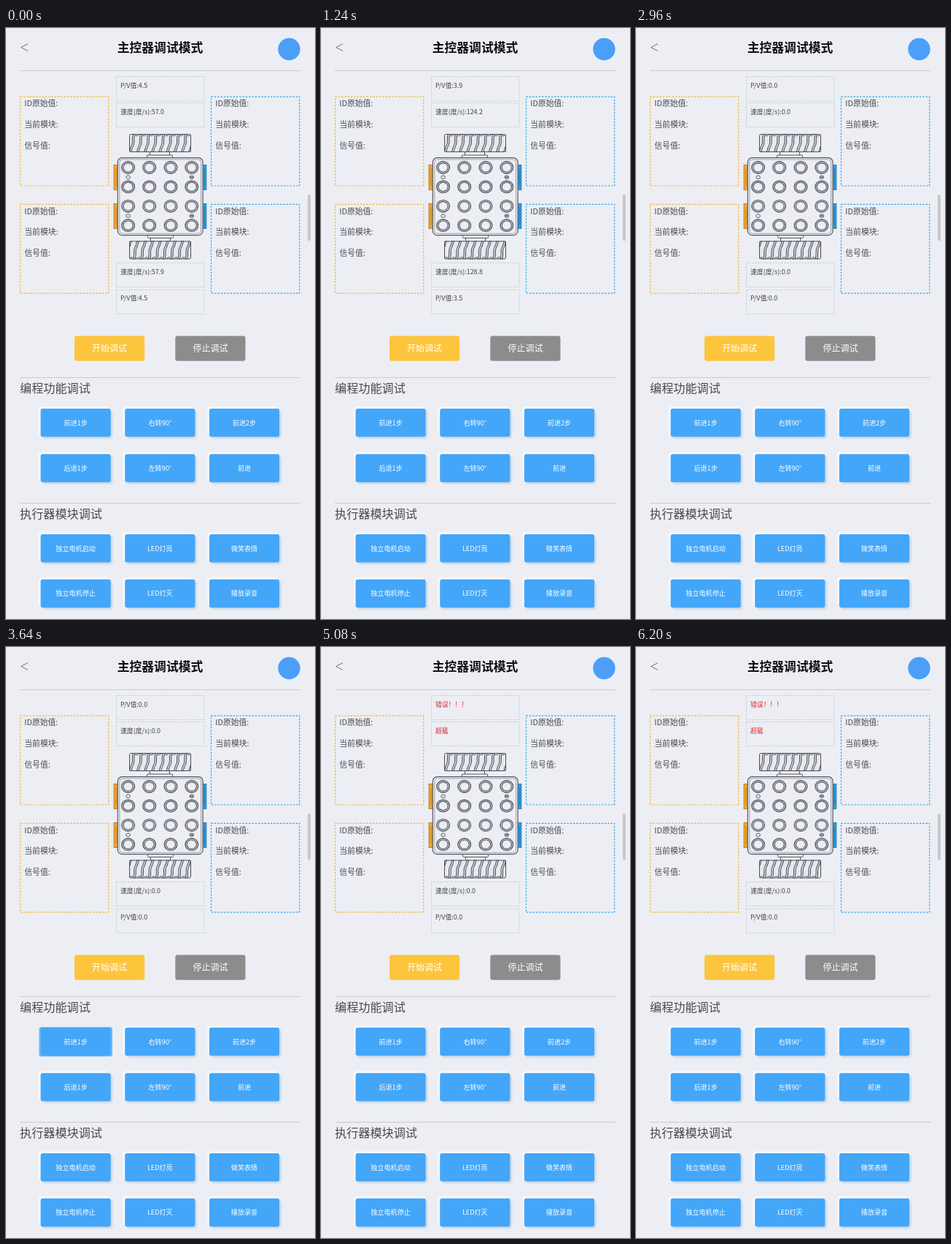
An HTML page that plays this animation: 424x809 px, repeating every 6450 ms.

```html
<!DOCTYPE html>
<html lang="zh-CN">
<head>
<meta charset="utf-8">
<title>主控器调试模式</title>
<style>
html, body { margin: 0; width: 100%; height: 100%; overflow: hidden; background: #eceef4; }
svg { display: block; width: 100%; height: 100%; }
text { font-family: "Noto Sans CJK SC", "Noto Sans CJK", sans-serif; fill: #494a50; }
.title { font-size: 16.8px; font-weight: 700; fill: #0c0c0e; }
.heading { font-size: 16.15px; }
.label { font-size: 10.8px; }
.reading { font-size: 8.9px; fill: #414247; }
.error { fill: #e6202a; }
.main { font-size: 12px; fill: #fff; }
.small { font-size: 9.1px; fill: #fff; }
.outline { fill: #eceef4; stroke: #565760; }
</style>
</head>
<body>
<svg id="stage" viewBox="0 0 424 809">
  <defs>
    <filter id="soft" x="-20%" y="-30%" width="140%" height="160%"><feGaussianBlur stdDeviation="1.3"/></filter>
    <filter id="glow" x="-20%" y="-30%" width="140%" height="160%"><feGaussianBlur stdDeviation=".7"/></filter>
    <clipPath id="tyre"><rect x="169" y="145" width="85" height="25" rx="2"/></clipPath>
  </defs>
</svg>
<script>
const LOOP = 6450;
const stage = document.getElementById('stage');

function add(tag, attrs, parent = stage) {
  const node = document.createElementNS('http://www.w3.org/2000/svg', tag);
  for (const key in attrs) node.setAttribute(key, attrs[key]);
  return parent.appendChild(node);
}
function rect(x, y, width, height, attrs, parent) {
  return add('rect', { x, y, width, height, ...attrs }, parent);
}
function write(x, y, content, style, anchor = 'start') {
  const node = add('text', { x, y, class: style, 'text-anchor': anchor });
  node.textContent = content;
  return node;
}

// Header
add('path', { d: 'M30 21.7 20.5 26.5 30 31.3', fill: 'none', stroke: '#66676d', 'stroke-width': .9 });
write(211.5, 33, '主控器调试模式', 'title', 'middle');
add('circle', { cx: 388.5, cy: 29, r: 15.2, fill: '#4b9ff9' });
for (const y of [58.5, 478.5, 650.5])
  add('path', { d: `M19 ${y}H404`, stroke: '#c9cbd0' });
rect(414, 228, 4, 63.5, { rx: 2, fill: '#c7c8cc' });

// Sensor panels
for (const [x, color] of [[19.5, '#f7b32d'], [281.5, '#2ba4ec']])
  for (const y of [94.2, 241.4]) {
    rect(x, y, 121.2, 121.8, { fill: 'none', stroke: color, 'stroke-width': 1.2, 'stroke-dasharray': '2.4 1.9' });
    ['ID原始值:', '当前模块:', '信号值:'].forEach((name, i) =>
      write(x + 5.8, y + 13.2 + i * 28.7, name, 'label'));
  }

// Motor panels
const readings = [66.5, 102.5, 321.5, 358.5].map((y, i) => {
  rect(151.5, y, 120.5, 33, { fill: 'none', stroke: '#c3cbd0', 'stroke-dasharray': '2.2 1.8' });
  return write(157, [81.8, 117.8, 336.6, 372.9][i], '', 'reading');
});

// Robot
function wheel(transform) {
  const group = add('g', { transform });
  rect(197.5, 169, 27, 6, { class: 'outline' }, group);
  rect(193.5, 174, 35, 4, { class: 'outline', rx: 1 }, group);
  const tyre = add('g', { 'clip-path': 'url(#tyre)' }, group);
  rect(169, 145, 85, 25, { fill: '#e7e9ef' }, tyre);
  for (let i = 0; i < 9; i++) {
    const x = 170.5 + i * 10.2;
    const d = `M${x + 6} 144C${x + 2} 150 ${x + 6} 156 ${x + 3} 161S${x + 2} 167 ${x - 1} 171`;
    add('path', { d, fill: 'none', stroke: '#3f4048', 'stroke-width': 3.4 }, tyre);
    add('path', { d, fill: 'none', stroke: '#dfe1e7', 'stroke-width': 1.5 }, tyre);
    add('path', { d: `M${x + 7} 147.5q3 .6 5-1.5`, fill: 'none', stroke: '#4c4d56' }, tyre);
  }
  rect(169.5, 145.5, 84, 24, { rx: 2, fill: 'none', stroke: '#4c4d56' }, group);
}
wheel('');
wheel('rotate(180 211.5 230.75)');

for (const y of [187.4, 240.4])
  for (const [x, color, edge] of [[148, '#f2a52e', '#a87626'], [269.5, '#279ce6', '#246f9d']]) {
    rect(x, y, 5.4, 34.2, { fill: color, stroke: edge, 'stroke-width': .8 });
    add('path', { d: `M${x + 3} ${y + 5}v24`, stroke: edge, 'stroke-width': .7 });
  }
rect(153.3, 177.7, 116.8, 106, { rx: 6, class: 'outline', 'stroke-width': 1.2 });
rect(155.8, 180, 111.8, 101.3, { rx: 4, class: 'outline', 'stroke-width': .5 });
for (const cx of [167.6, 196.7, 226, 254.8])
  for (const cy of [191, 217.4, 243.8, 270.2]) {
    add('ellipse', { cx, cy, rx: 8.8, ry: 8.2, class: 'outline', 'stroke-width': 1.4 });
    add('ellipse', { cx, cy, rx: 6.6, ry: 6.2, class: 'outline', 'stroke-width': 1.2 });
  }
for (const cx of [167.6, 254.8])
  for (const cy of [204.3, 257.2]) {
    add('ellipse', { cx, cy, rx: 2.8, ry: 2.3, class: 'outline' });
    if (cx > 200) add('path', { d: `M${cx - 2} ${cy}h4`, stroke: '#41424b', 'stroke-width': 1.4 });
  }

// Buttons
for (const [x, color, name] of [[94, '#fdc53c', '开始调试'], [232.3, '#8c8c8d', '停止调试']]) {
  rect(x, 421.5, 96.2, 34.2, { rx: 3, fill: color });
  write(x + 48.1, 443.1, name, 'main', 'middle');
}
write(19, 499.2, '编程功能调试', 'heading');
write(19, 671, '执行器模块调试', 'heading');

let raised, pressed;
const rows = [
  [521, ['前进1步', '右转90°', '前进2步']],
  [583.2, ['后退1步', '左转90°', '前进']],
  [693, ['独立电机启动', 'LED灯亮', '微笑表情']],
  [754.8, ['独立电机停止', 'LED灯灭', '播放录音']]
];
for (const [y, names] of rows)
  names.forEach((name, i) => {
    const x = 47.5 + i * 115.7;
    const shadows = add('g', {});
    rect(x - 2.5, y - 2.5, 96.2, 38.6, { rx: 4, fill: '#f9fbfe', filter: 'url(#soft)' }, shadows);
    rect(x + 2.5, y + 2.5, 96.2, 38.6, { rx: 4, fill: '#cbd8e6', filter: 'url(#soft)' }, shadows);
    if (!raised) {
      raised = shadows;
      pressed = rect(x - 2.2, y - .8, 100.6, 40.2, { rx: 3, fill: '#75b7ee', filter: 'url(#glow)' });
    }
    rect(x, y, 96.2, 38.6, { rx: 3, fill: '#43a6f9' });
    write(x + 48.1, y + 22.6, name, 'small', 'middle');
  });

// Start time, then upper value and speed, lower speed and value
const motorStates = [
  [0, '4.5', '57.0', '57.9', '4.5'],
  [620, '3.9', '124.2', '128.8', '3.5'],
  [1760, '0.0', '0.0', '0.0', '0.0'],
  [4000, '22.2', '29.9', '28.0', '4.7'],
  [4720, '错误！！！', '超载', '0.0', '0.0']
];
const prefixes = ['P/V值:', '速度(度/s):', '速度(度/s):', 'P/V值:'];

function draw(now) {
  const time = now % LOOP;
  const [start, ...values] = motorStates.findLast(state => state[0] <= time);
  readings.forEach((node, i) => {
    const failed = i < 2 && start === 4720;
    node.textContent = failed ? values[i] : prefixes[i] + values[i];
    node.classList.toggle('error', failed);
  });
  const down = time >= 3440 && time < 3760;
  raised.style.display = down ? 'none' : '';
  pressed.style.display = down ? '' : 'none';
  requestAnimationFrame(draw);
}
draw(0);
</script>
</body>
</html>
```
